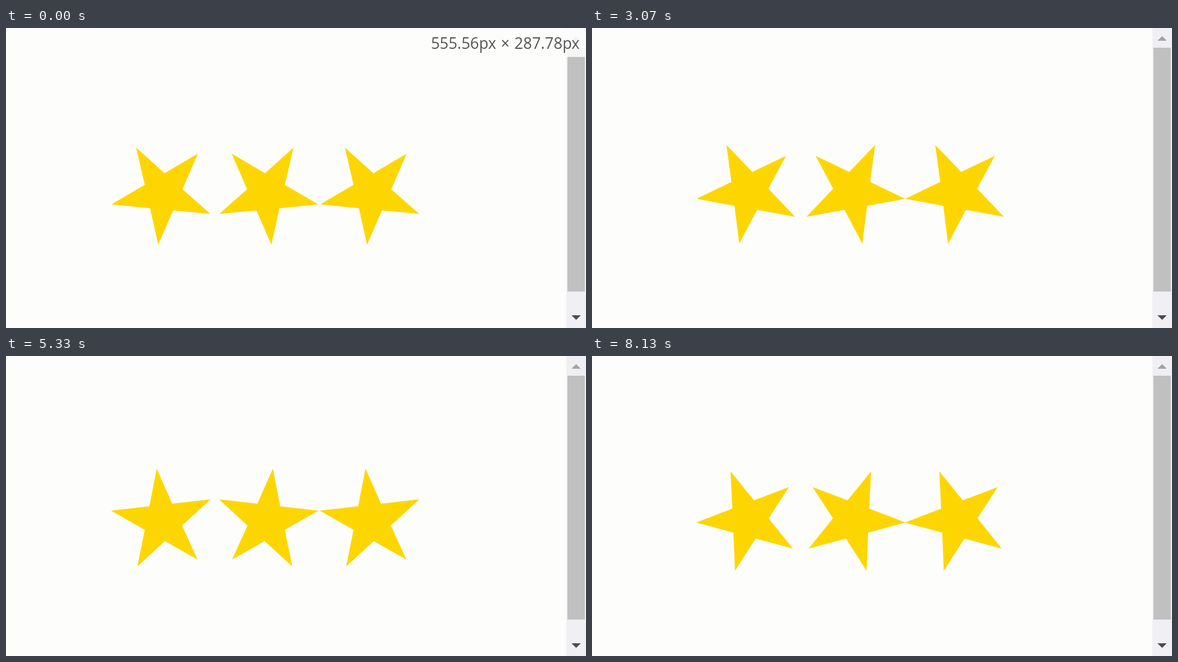
These frames come from a looping animation (1000x518 px, 8.16 s). An HTML page:

```html
<!DOCTYPE html>
<html lang="en">
<head>
<meta charset="utf-8">
<title>Rotating stars</title>
<style>
  html, body { margin: 0; height: 100%; overflow: hidden; background: #fdfdfc; }
  svg { display: block; width: 100vw; height: 100vh; }
  text { font: 26.5px "Open Sans", "Noto Sans", sans-serif; word-spacing: 1.3px; fill: #555; }
</style>
</head>
<body>
<svg viewBox="0 0 1000 518">
  <defs>
    <path id="star" fill="#fdd602" d="M0-90 19.8-27H86.4L32.4 12.6 52.2 73.8 0 36-52.2 73.8-32.4 12.6-86.4-27H-19.8Z"/>
  </defs>

  <g id="scrollbar">
    <rect x="966" width="34" height="518" fill="#f0f0f4"/>
    <rect x="968" y="34" width="30" height="421" fill="#c0c0c0"/>
    <path d="M975 22h16l-8-8z" fill="#a3a3a3"/>
    <path d="M975 496h16l-8 8z" fill="#4c4c4c"/>
  </g>

  <use class="star" href="#star"/>
  <use class="star" href="#star"/>
  <use class="star" href="#star"/>

  <g id="size">
    <rect x="724" width="276" height="50" fill="#fdfdfc" fill-opacity=".88"/>
    <text x="989" y="36" text-anchor="end">555.56px × 287.78px</text>
  </g>
</svg>
<script>
  const LOOP = 8160, FPS = 30, TURN = 5000, START_ANGLE = 329.5, SIZE_HIDES = 430;
  const stars = document.querySelectorAll('.star');
  const size = document.getElementById('size');
  const origin = performance.now();

  function draw(now) {
    const time = Math.max(0, now - origin) % LOOP;
    // Motion advances in 30 fps steps, rounded to 10 ms.
    const stepped = Math.floor((time + 4) * FPS / 1000) * 1000 / FPS;
    const angle = START_ANGLE + stepped / TURN * 360;
    stars.forEach((star, i) => {
      const direction = i === 1 ? -1 : 1;
      star.setAttribute('transform', `translate(${270 + 180 * i} 284) rotate(${direction * angle})`);
    });
    size.style.display = time < SIZE_HIDES ? '' : 'none';
    requestAnimationFrame(draw);
  }
  draw(origin);
</script>
</body>
</html>
```
